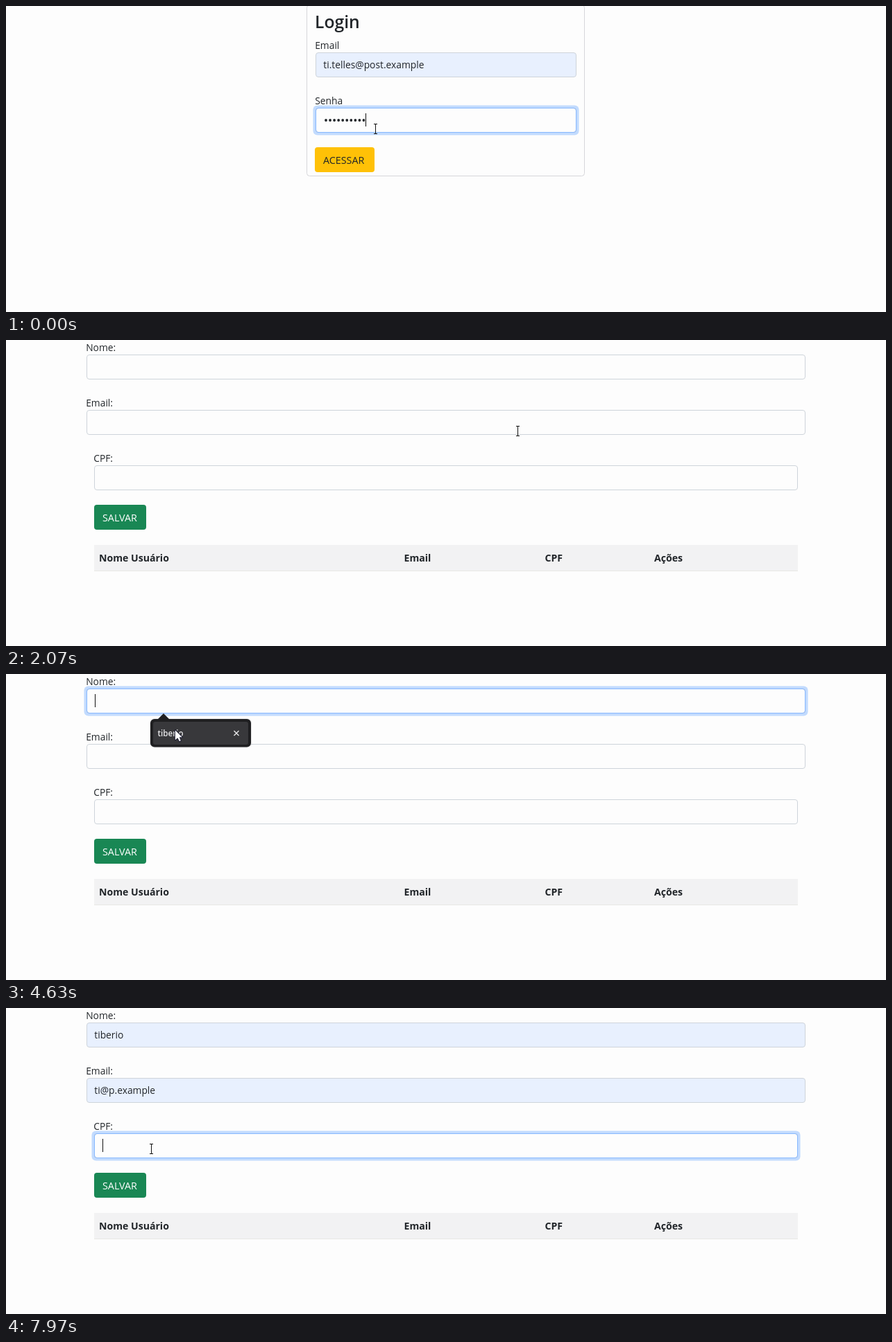
These frames come from a looping animation (1268 px wide and 442 px high, 8 s). An HTML page with a canvas:

```html
<!DOCTYPE html>
<html lang="pt-BR">
<head>
<meta charset="utf-8">
<title>Login e cadastro</title>
<style>
html, body { margin: 0; width: 100%; height: 100%; overflow: hidden; background: #fdfdfd; }
canvas { display: block; }
</style>
</head>
<body>
<canvas id="stage" width="1268" height="442"></canvas>
<script>
const ctx = document.getElementById('stage').getContext('2d');
const LOOP = 8000, ROW = 36, ITEM = 33.5, HOLD = 60;
const SANS = '"Open Sans", "Noto Sans", sans-serif';
const PAGE = '#fdfdfd', INK = '#212529', DARK = '#1f1f21', PALE = '#e8e8ea';
const NAME = 'tiberio', MAIL = 'ti@p.example';

// Controls: left, top, width
const UI = {
  user: [446, 67, 376], pass: [446, 147, 376], enter: [445, 204, 86],
  name: [116, 21, 1036], mail: [116, 101, 1036], cpf: [127, 181, 1014], save: [127, 238, 75]
};

// Moments (ms) at which the interface changes
const T = {
  login: 500, ok1: 1720, form: 1780, save: 2830, ok2: 3790,
  name: 4120, namePick: 4850, mail: 5600, mailHover: 6180, mailPick: 6880, cpf: 7640
};

// The pointer rests briefly at each stop and glides between them
const STOPS = [
  [0, 532, 177], [T.login, 515, 219], [770, 513, 217], [1270, 872, 150], [T.ok1, 793, 97],
  [2070, 737, 131], [T.save, 170, 258], [T.ok2, 785, 94], [T.name, 240, 42],
  [T.namePick, 244, 88], [5330, 232, 115], [T.mail, 232, 115],
  [T.mailHover, 244, 167], [T.mailPick, 244, 167], [T.cpf, 209, 203]
];

const clamp = v => Math.min(1, Math.max(0, v));
const within = (t, a, b) => t >= a && t < b;
const fade = (t, on, off) => clamp((t - on) / 150) - clamp((t - off) / 150);
const inside = ([px, py], [x, y, w, h = ROW]) => within(px, x, x + w) && within(py, y, y + h);

function pointerAt(t) {
  const i = STOPS.findLastIndex(s => s[0] <= t);
  const a = STOPS[i], b = STOPS[i + 1] || a;
  const u = clamp((t - a[0] - HOLD) / (b[0] - a[0] - 2 * HOLD));
  const e = u * u * (3 - 2 * u);
  return [a[1] + (b[1] - a[1]) * e, a[2] + (b[2] - a[2]) * e];
}

function text(s, x, y, size = 13.8, color = INK, weight = 400, family = SANS) {
  ctx.font = `${weight} ${size}px ${family}`;
  ctx.fillStyle = color;
  ctx.fillText(s, x, y);
  return ctx.measureText(s).width;
}

function box(x, y, w, h, r, fill, stroke, line = 1) {
  ctx.beginPath();
  ctx.roundRect(x, y, w, h, r);
  if (fill) { ctx.fillStyle = fill; ctx.fill(); }
  if (stroke) { ctx.strokeStyle = stroke; ctx.lineWidth = line; ctx.stroke(); }
}

function glow(x, y, w, color) {
  box(x - 3.5, y - 3.5, w + 7, ROW + 7, 6, color);
}

function field(label, [x, y, w], focus, filled) {
  text(label, x - .8, y - 5.5);
  ctx.globalAlpha = focus;
  glow(x, y, w, '#c2dbfe');
  ctx.globalAlpha = 1;
  box(x + .5, y + .5, w - 1, ROW - 1, 3.5, filled ? '#e8f0fe' : PAGE, '#ced4da');
  ctx.globalAlpha = focus;
  box(x + .5, y + .5, w - 1, ROW - 1, 3.5, null, '#86b7fe');
  ctx.globalAlpha = 1;
}

function value(s, [x, y]) {
  return text(s, x + 11.3, y + 23.3);
}

function button(label, [x, y, w], fill, color, ring) {
  if (ring) glow(x, y, w, ring);
  box(x, y, w, ROW, 4, fill);
  text(label, x + 12, y + 23.5, 14.3, color);
}

function caret([x, y], offset, since) {
  if (since % 1060 >= 530) return;
  ctx.fillStyle = '#111';
  ctx.fillRect(Math.round(x + 12 + offset), y + 8, 1, 19);
}

function loginPage(t, p) {
  box(433.5, -1.5, 400, 247, 4, null, '#d6d6da');
  text('Login', 445, 32, 24.7, INK, 600);
  field('Email', UI.user, 0, true);
  value('ti.telles@post.example', UI.user);
  field('Senha', UI.pass, fade(t, -200, T.login));
  ctx.fillStyle = INK;
  for (let i = 0; i < 10; i++) {
    ctx.beginPath();
    ctx.arc(461 + i * 6.05, 165, 1.9, 0, 7);
    ctx.fill();
  }
  const clicked = t >= T.login;
  if (!clicked) caret(UI.pass, 60, t);
  const fill = clicked || inside(p, UI.enter) ? '#ffca2c' : '#ffc107';
  button('ACESSAR', UI.enter, fill, INK, clicked && '#f2d170');
}

function formPage(t, p) {
  const named = t >= T.namePick, mailed = t >= T.mailPick;
  const preview = within(t, T.mailHover, T.mailPick);

  field('Nome:', UI.name, fade(t, T.name, T.mail), named);
  const nameWidth = named ? value(NAME, UI.name) : 0;
  if (within(t, T.name, T.mail)) {
    if (named) squiggle(128, 47, nameWidth);
    caret(UI.name, nameWidth, t - (named ? T.namePick : T.name));
  }

  field('Email:', UI.mail, fade(t, T.mail, T.cpf), preview || mailed);
  const mailWidth = mailed ? value(MAIL, UI.mail) : 0;
  if (preview) text(MAIL, 127.5, 124, 12, INK, 400, '"Liberation Sans", sans-serif');
  if (within(t, T.mail, T.cpf))
    caret(UI.mail, mailWidth, t - (mailed ? T.mailPick : preview ? T.mailHover : T.mail));

  field('CPF:', UI.cpf, fade(t, T.cpf, LOOP));
  if (t >= T.cpf) caret(UI.cpf, 0, t - T.cpf);

  const pressed = within(t, T.save, T.name);
  button('SALVAR', UI.save, pressed ? '#157347' : '#198754', '#fff', pressed && '#8cc3aa');

  box(127, 296, 1014, 38, 0, '#f2f2f3');
  box(127, 333, 1014, 1, 0, '#e8e8e4');
  [['Nome Usuário', 134], ['Email', 573.5], ['CPF', 776.5], ['Ações', 934]]
    .forEach(([s, x]) => text(s, x, 320, 14.1, INK, 700));

  const list = openList(t);
  if (list) suggestions(list, p);
}

// Suggestion list hanging below the focused field
function openList(t) {
  const show = (field, items) => ({ items, rect: [208, field[1] + 44, 145, 7 + items.length * ITEM] });
  if (within(t, T.name + 100, T.namePick)) return show(UI.name, [NAME]);
  if (within(t, T.mail + 100, T.mailPick)) return show(UI.mail, [MAIL, 'ti', 'hrvuxk', 't@p.example']);
}

function suggestions({ items, rect }, p) {
  const [x, y] = rect;
  shadow(2);
  box(...rect, 6, DARK);
  shadow(0);
  ctx.beginPath();
  for (const side of [-1, 0, 1]) ctx.lineTo(227 + side * 9, y + 1 - 9 * (side === 0));
  ctx.fill();
  items.forEach((s, i) => {
    const top = y + 4 + i * ITEM;
    if (inside(p, [x, top, 145, ITEM])) {
      box(x + 4, top, 137, 33, 3, '#38383b');
      cross(332, top + 16.5, 3.5);
    }
    text(s, x + 10.5, top + 21, 11.6, PALE, 600);
  });
}

function cross(x, y, r) {
  ctx.beginPath();
  for (const s of [-1, 1]) {
    ctx.moveTo(x - r, y - r * s);
    ctx.lineTo(x + r, y + r * s);
  }
  ctx.strokeStyle = PALE;
  ctx.lineWidth = 1.4;
  ctx.stroke();
}

function squiggle(x, y, w) {
  ctx.beginPath();
  for (let i = 0; i <= w; i += 2) ctx.lineTo(x + i, y + (i / 2 % 2 ? 1 : -1));
  ctx.strokeStyle = '#e03030';
  ctx.lineWidth = 1;
  ctx.stroke();
}

function shadow(blur) {
  ctx.shadowColor = blur ? 'rgba(0,0,0,.3)' : 'transparent';
  ctx.shadowBlur = blur;
}

function alertBox(message) {
  shadow(4);
  box(425.5, -4.5, 417, 135.5, 11, DARK, '#66666c');
  shadow(0);
  text('127.0.0.1:5500 diz', 444, 30.5, 13.6, PALE, 600);
  text(message, 444, 57.5, 11.4, PALE);
  box(761.5, 74, 64.5, 41, 20.5, null, '#a8c7fa', 2);
  box(764.5, 77, 58.5, 35.5, 17.5, '#a8c7fa');
  text('OK', 785, 99, 11.3, '#0b2a5c', 600);
}

// White silhouette with a dark outline
function outlined() {
  ctx.strokeStyle = '#16162a';
  ctx.fillStyle = '#fff';
  ctx.lineWidth = 2;
  ctx.lineJoin = 'round';
  ctx.stroke();
  ctx.fill();
}

function arrow(x, y) {
  ctx.beginPath();
  [[0, 1], [0, 15], [3.5, 12], [6, 17], [8, 16], [6, 11], [10, 11]]
    .forEach(([a, b]) => ctx.lineTo(x + .5 + a, y + b));
  ctx.closePath();
  outlined();
}

function hand(x, y) {
  ctx.beginPath();
  ctx.roundRect(x - 6, y + 11, 7, 5, 2);
  ctx.roundRect(x - 2, y + 10, 11, 10, 3);
  for (let i = 0; i < 4; i++) {
    const top = i ? 6 + i * .7 : .5;
    ctx.roundRect(x - 1.5 + i * 2.8, y + top, 3, 15 - top, 1.5);
  }
  outlined();
  ctx.fillStyle = '#16162a';
  for (let i = 1; i < 4; i++) ctx.fillRect(x - 1.5 + i * 2.8, y + 8, .8, 4);
}

function ibeam(x, y) {
  x = Math.round(x);
  y = Math.round(y);
  ctx.fillStyle = '#111';
  ctx.fillRect(x, y - 7, 1, 15);
  for (const dy of [-7, 7])
    for (const dx of [-2, 1]) ctx.fillRect(x + dx, y + dy, 2, 1);
}

function pointerShape(t, p) {
  const list = openList(t);
  if (list && inside(p, list.rect)) return arrow;
  const { user, pass, enter, name, mail, cpf, save } = UI;
  const [fields, btn] = t < T.form ? [[user, pass], enter] : [[name, mail, cpf], save];
  if (inside(p, btn)) return hand;
  return !alertAt(t) && fields.some(f => inside(p, f)) ? ibeam : arrow;
}

function alertAt(t) {
  if (within(t, T.login + 40, T.ok1)) return 'Campos preenchidos com sucesso';
  if (within(t, T.save + 40, T.ok2)) return 'Preencha todos os campos';
}

function draw() {
  const t = performance.now() % LOOP;
  const p = pointerAt(t), message = alertAt(t);
  ctx.fillStyle = PAGE;
  ctx.fillRect(0, 0, 1268, 442);
  (t < T.form ? loginPage : formPage)(t, p);
  if (message) alertBox(message);
  pointerShape(t, p)(...p);
  requestAnimationFrame(draw);
}
draw();
</script>
</body>
</html>
```
